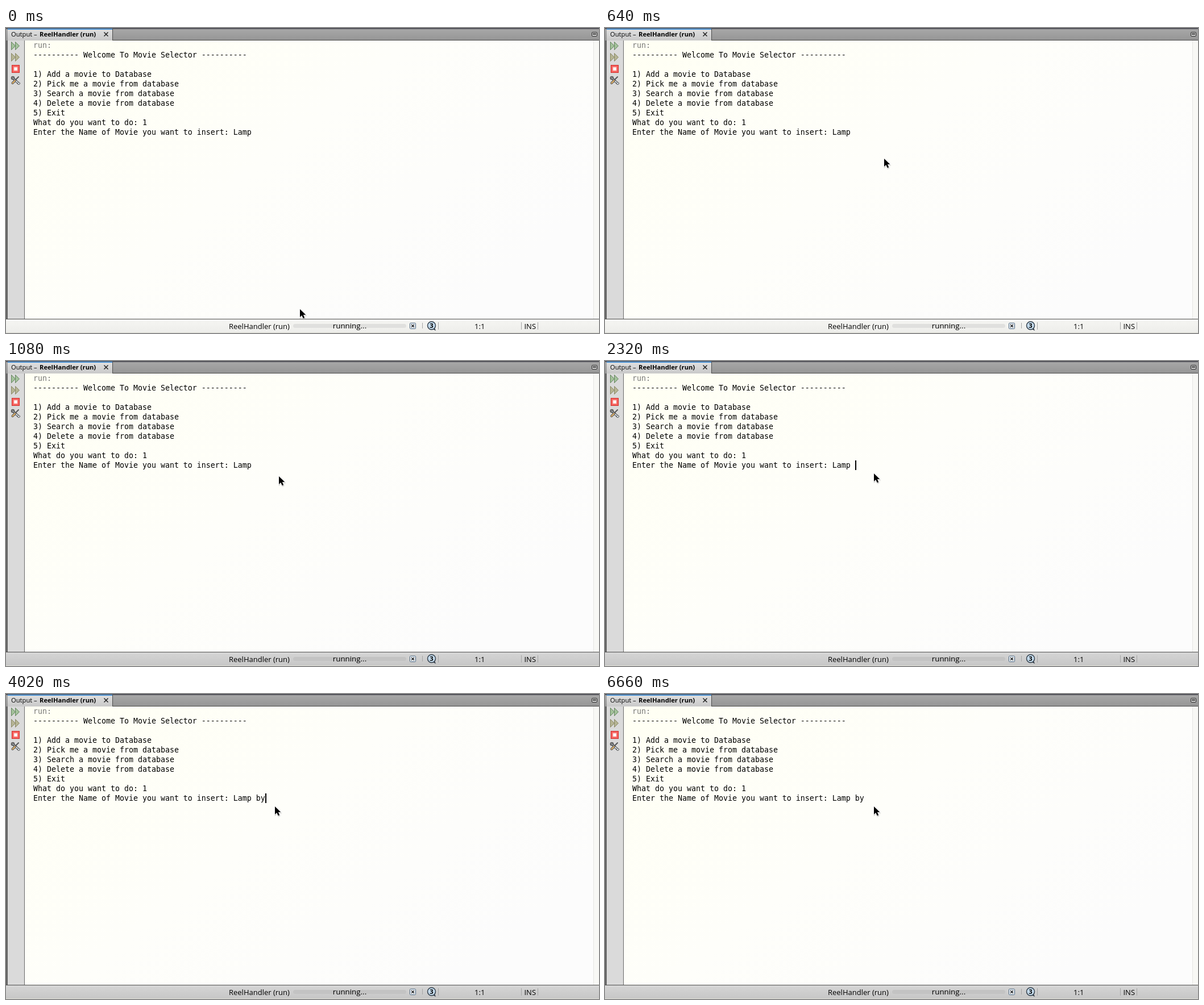
Recreate the animation shown at these times as an HTML page. Size 1043 by 537 pixels, loop 8 s.

```html
<!DOCTYPE html>
<html lang="en">
<head>
<meta charset="utf-8">
<title>Output console</title>
<style>
  html, body { margin: 0; width: 100%; height: 100%; overflow: hidden; background: #fdfdf9; }
  svg { display: block; width: 1043px; height: 537px; }
  text { white-space: pre; }
  .mono { font: 13.29px "DejaVu Sans Mono", monospace; fill: #000; }
  .tab { font: 11.2px "Open Sans", "Noto Sans", sans-serif; }
  .bold { font-weight: 700; }
  .status { font: 13px "Open Sans", "Noto Sans", sans-serif; }
</style>
</head>
<body>
<svg viewBox="0 0 1043 537" xmlns="http://www.w3.org/2000/svg">
  <defs>
    <linearGradient id="paper" x1="0" y1="0" x2="1" y2="0.6">
      <stop offset="0" stop-color="#fffff3"/>
      <stop offset="0.5" stop-color="#fefefa"/>
      <stop offset="1" stop-color="#fcfcfc"/>
    </linearGradient>
    <linearGradient id="header" x1="0" y1="0" x2="0" y2="1">
      <stop offset="0" stop-color="#a9a9a9"/>
      <stop offset="1" stop-color="#959595"/>
    </linearGradient>
    <linearGradient id="tabFill" x1="0" y1="0" x2="0" y2="1">
      <stop offset="0" stop-color="#e0e0e0"/>
      <stop offset="1" stop-color="#c9c9c9"/>
    </linearGradient>
    <linearGradient id="light" x1="0" y1="0" x2="0" y2="1">
      <stop offset="0" stop-color="#f6f6f3"/>
      <stop offset="1" stop-color="#ededea"/>
    </linearGradient>
    <linearGradient id="dark" x1="0" y1="0" x2="0" y2="1">
      <stop offset="0" stop-color="#d6d6d6"/>
      <stop offset="1" stop-color="#c6c6c6"/>
    </linearGradient>
    <path id="play" d="M.5 .5 L7.5 7.5 L.5 14.5Z M7.5 .5 L14.5 7.5 L7.5 14.5Z" stroke-linejoin="round"/>
  </defs>

  <!-- console -->
  <rect x="33" y="22" width="1000" height="490" fill="url(#paper)"/>
  <rect x="1033" y="22" width="10" height="490" fill="#f8f8f5"/>
  <path d="M1033.5 22V512" stroke="#e6e6e3"/>

  <!-- tool strip -->
  <rect y="22" width="33" height="490" fill="#dadada"/>
  <rect width="3" height="513" fill="#666"/>
  <path d="M32.5 22V512" stroke="#6b6b6b"/>
  <use href="#play" x="9" y="24" fill="#a3c19b" stroke="#66855f"/>
  <use href="#play" x="9" y="44" fill="#b5b494" stroke="#8a8966"/>
  <rect x="10.5" y="65.500" width="13" height="13" fill="#f6605c" stroke="#d0302e"/>
  <rect x="14" y="69" width="6" height="6" fill="#fff" stroke="#f9b0ac"/>
  <g fill="none" stroke-linecap="round">
    <path d="M12.500 88.500L22 97.500" stroke="#444" stroke-width="4"/>
    <path d="M12.500 88.500L22 97.500" stroke="#dce6ee" stroke-width="2"/>
    <circle cx="12" cy="88" r="2.500" stroke="#555" stroke-width="1.500"/>
    <path d="M11.500 97L16 92.500" stroke="#555" stroke-width="4"/>
    <path d="M11.500 97L16 92.500" stroke="#e6b568" stroke-width="2"/>
    <path d="M17 91L22 86" stroke="#555" stroke-width="2"/>
    <circle cx="22.500" cy="97.500" r="2" fill="#dce6ee" stroke="#555"/>
  </g>

  <!-- tab bar -->
  <rect width="1043" height="22" fill="url(#header)"/>
  <rect width="1043" height="2" fill="#55555c"/>
  <rect x="3" y="2" width="184" height="20" fill="url(#tabFill)"/>
  <rect x="3" y="1" width="184" height="2" fill="#4d93d4"/>
  <path d="M187.500 2V22M188 21.500H1043" stroke="#4b4b4b"/>
  <text class="tab" x="9" y="15">Output –</text>
  <text class="tab bold" x="59" y="15">ReelHandler (run)</text>
  <path d="M172.500 7.500L179.500 14.500M179.500 7.500L172.500 14.500" stroke="#222" stroke-width="1.500"/>
  <rect x="1030.500" y="7.500" width="9" height="7" rx="1.500" fill="#ccc" stroke="#2d2d2d"/>
  <path d="M1032 10.500H1038" stroke="#2d2d2d" stroke-width="2"/>

  <g id="lines" class="mono"></g>
  <rect id="caret" y="175" width="2" height="17"/>

  <!-- status bar -->
  <rect id="bar" y="512" width="1043" height="25"/>
  <path d="M0 512.500H1043" stroke="#505050"/>
  <path d="M0 536.500H1043" stroke="#deded5"/>
  <rect id="track" x="505" y="521" width="199" height="7" rx="3.500"/>
  <g class="status">
    <text x="392" y="529.500">ReelHandler (run)</text>
    <text x="604.500" y="529" text-anchor="middle" font-size="13.300">running...</text>
    <text x="824" y="529.500">1:1</text>
    <text x="911.500" y="529.500">INS</text>
  </g>
  <rect x="710.500" y="519.500" width="10" height="10" rx="1" fill="#eef4fa" stroke="#47617b"/>
  <path d="M713 522L718 527M718 522L713 527" stroke="#222" stroke-width="1.500"/>
  <path d="M732.500 519V529M760.500 518V531M906.500 518V531M935.500 518V531" stroke="#a5a5a5"/>
  <path d="M750 530L756 533L754 528Z" fill="#35414d"/>
  <circle cx="748.500" cy="524" r="7" fill="#c5dcee" stroke="#35414d" stroke-width="1.500"/>
  <text class="tab bold" x="748.500" y="528" text-anchor="middle">3</text>

  <g id="pointer">
    <path d="M0 0V14L3.300 11L5.700 16.300L8.200 15.200L5.900 10.100H10.300Z" fill="#777" opacity=".3" transform="translate(.5 1.500)" stroke="#777" stroke-width="1.500"/>
    <path d="M0 0V14L3.300 11L5.700 16.300L8.200 15.200L5.900 10.100H10.300Z" stroke="#fff" stroke-width="1.200" stroke-linejoin="round" paint-order="stroke"/>
  </g>
</svg>
<script>
const LOOP = 8000;
const CHAR = 8, LEFT = 48;
const PROMPT = "Enter the Name of Movie you want to insert: ";
const TITLE = "Lamp by ";
const LINES = [
  "run:",
  "---------- Welcome To Movie Selector ----------",
  "",
  "1) Add a movie to Database",
  "2) Pick me a movie from database",
  "3) Search a movie from database",
  "4) Delete a movie from database",
  "5) Exit",
  "What do you want to do: 1",
  PROMPT
];

// [time, letters typed, caret shown]
const TYPING = [
  [0, 4, false], [1480, 5, true], [3760, 6, true],
  [4020, 7, true], [5260, 8, true], [6660, 8, false]
];

// [start, end, from, to, easing power]
const MOVES = [
  [0, 820, [517.5, 495.5], [489, 206.5], 2.2],
  [920, 1060, [489, 206.5], [479.5, 202.5], 1.5],
  [1800, 2300, [479.5, 202.5], [472.5, 197.5], 2]
];
const DIM_AT = 1080;

const byId = id => document.getElementById(id);
const [caret, bar, track, pointer] = ["caret", "bar", "track", "pointer"].map(byId);

const rows = LINES.map((line, i) => {
  const row = document.createElementNS("http://www.w3.org/2000/svg", "text");
  row.setAttribute("x", LEFT);
  row.setAttribute("y", 35 + 17 * i);
  if (i === 0) row.style.fill = "#777";
  row.textContent = line;
  byId("lines").append(row);
  return row;
});
const input = rows[rows.length - 1];

function easeInOut(p, power) {
  const half = q => Math.pow(2 * q, power) / 2;
  return p < 0.5 ? half(p) : 1 - half(1 - p);
}

function pointerAt(t) {
  const move = MOVES.filter(m => m[0] <= t).pop();
  const [start, end, from, to, power] = move;
  const p = easeInOut(Math.min(1, (t - start) / (end - start)), power);
  return from.map((v, i) => Math.round(v + (to[i] - v) * p));
}

function draw(t) {
  const [, count, shown] = TYPING.filter(s => s[0] <= t).pop();
  input.textContent = PROMPT + TITLE.slice(0, count);
  caret.setAttribute("x", LEFT + CHAR * (PROMPT.length + count));
  caret.setAttribute("visibility", shown ? "visible" : "hidden");

  const dim = t >= DIM_AT;
  bar.setAttribute("fill", dim ? "url(#dark)" : "url(#light)");
  track.setAttribute("fill", dim ? "#c3c3c3" : "#e0e0de");

  pointer.setAttribute("transform", `translate(${pointerAt(t).join(" ")})`);
}

function tick() {
  draw(performance.now() % LOOP);
  requestAnimationFrame(tick);
}
tick();
</script>
</body>
</html>
```
